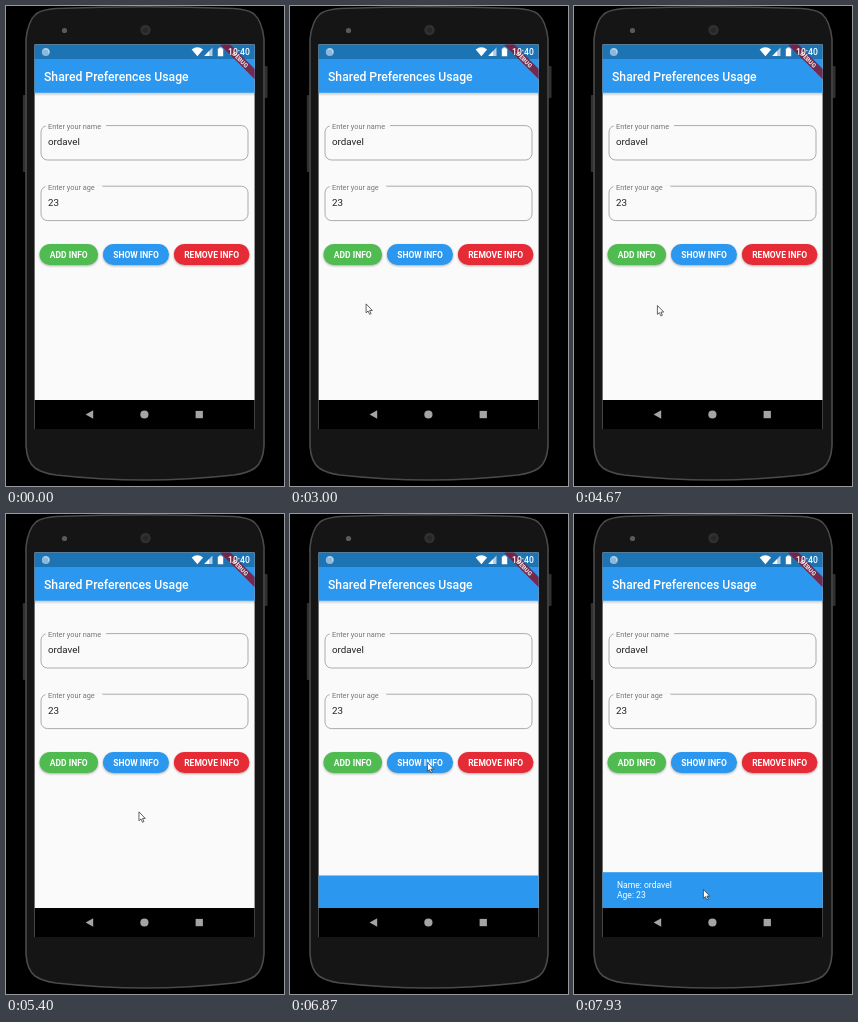
Recreate the animation shown at these times as an HTML page. Size 278 px wide and 480 px high, loop 8 s.

```html
<!DOCTYPE html>
<html lang="en">
<head>
<meta charset="utf-8">
<title>Saved info demo</title>
<style>
  html, body { margin: 0; width: 100%; height: 100%; overflow: hidden; background: #000; }
  svg { display: block; width: 100vw; height: 100vh; font-family: Roboto, "Open Sans", sans-serif; }
  .title { font-size: 12.2px; font-weight: 500; fill: #fff; }
  .label { font-size: 7.33px; fill: #777; }
  .value { font-size: 9.8px; fill: #222; }
  .box { fill: none; stroke: #999; stroke-width: .8; }
  .button text { font-size: 8.5px; font-weight: 700; fill: #fff; text-anchor: middle; }
  .snack { font-size: 8.55px; fill: #fff; }
  .clock { font-size: 8.6px; font-weight: 500; fill: #fff; }
  .banner { font-size: 6.1px; font-weight: 900; fill: #e8dde2; text-anchor: middle; }
</style>
</head>
<body>
<svg viewBox="0 0 278 480" preserveAspectRatio="none">
  <defs>
    <filter id="soft" x="-20%" y="-40%" width="140%" height="200%">
      <feGaussianBlur stdDeviation=".9"/>
    </filter>
    <linearGradient id="fade" x2="0" y2="1">
      <stop stop-color="#000" stop-opacity=".2"/>
      <stop offset="1" stop-color="#000" stop-opacity="0"/>
    </linearGradient>
    <clipPath id="screen"><rect x="28.6" y="38.6" width="220" height="384.4"/></clipPath>
    <clipPath id="page"><rect x="28" y="87" width="222" height="307"/></clipPath>
  </defs>

  <rect width="278" height="480" fill="#000"/>

  <!-- phone body -->
  <g fill="#303030">
    <rect x="16.8" y="89" width="3" height="77" rx="1"/>
    <rect x="258.5" y="60" width="3" height="32" rx="1"/>
  </g>
  <path d="M139 .8Q95 .8 50 2.5Q36 3.5 30 8Q22 15 20 33V440Q21 456 29 462Q36 467 50 469Q95 474 139 474T228 469Q242 467 249 462Q257 456 258 440V33Q256 15 248 8Q242 3.5 228 2.5Q183 .8 139 .8Z"
        fill="#151515" stroke="#4a4a4a" stroke-width="1.6"/>
  <circle cx="139.5" cy="24" r="5.2" fill="#303030"/>
  <circle cx="139.5" cy="24" r="2.6" fill="#22282c"/>
  <circle cx="58.5" cy="24.5" r="2.6" fill="#5a5a5a"/>

  <g clip-path="url(#screen)">
    <rect x="28" y="38" width="222" height="386" fill="#fafafa"/>
    <rect x="28" y="86.7" width="222" height="3.5" fill="url(#fade)"/>
    <rect x="28" y="38" width="222" height="15" fill="#1d74b5"/>
    <rect x="28" y="53" width="222" height="33.8" fill="#2b97ee"/>
    <text class="title" x="38" y="74.9">Shared Preferences Usage</text>

    <!-- status icons -->
    <circle cx="39.8" cy="46" r="4" fill="#8db9dc"/>
    <path d="M38 43.5A3 3 0 0 1 42.6 47" fill="none" stroke="#c9dfef"/>
    <g fill="#fff">
      <path d="M185.7 43.6Q191.4 39 197.1 43.6L191.4 50.3Z"/>
      <path d="M206.5 41.6V50H198.3Z" fill-opacity=".65"/>
      <path d="M203.2 45V50H198.3Z"/>
      <path d="M211.8 42.6H213.2V41.5H215.8V42.6H217.2V50.2H211.8Z"/>
    </g>

    <g transform="translate(249 39) rotate(45)">
      <rect x="-24.5" y="17.1" width="49" height="7.3" fill="#7d1d3c" fill-opacity=".9"/>
      <text class="banner" y="23">DEBUG</text>
    </g>
    <text class="clock" x="222" y="49.2">10:40</text>

    <g id="fields"></g>
    <g id="buttons"></g>

    <g clip-path="url(#page)">
      <rect id="bar" x="28" width="222" height="36" fill="#2b97ee"/>
      <g id="note">
        <text class="snack" x="43" y="374.2">Name: ordavel</text>
        <text class="snack" x="43" y="383.8">Age: 23</text>
      </g>
    </g>

    <rect x="28" y="394" width="222" height="30" fill="#000"/>
    <g fill="#a4a4a4">
      <path d="M87.2 404.2V412.8L79.6 408.5Z"/>
      <circle cx="138.4" cy="408.5" r="4.1"/>
      <rect x="189.6" y="404.9" width="7.3" height="7.3"/>
    </g>
  </g>

  <path id="pointer" d="M.4 .5V9.4L2.4 7.6L3.9 10.9L5.4 10.2L3.9 7.1H6.7Z"
        fill="#fff" stroke="#333" stroke-width=".75" stroke-linejoin="round"/>
</svg>

<script>
  const get = id => document.getElementById(id);
  const LOOP = 8000, TICK = 200 / 3;

  function field(label, value, row) {
    const y = 119.6 + 60.6 * row;
    const gap = 5 + label.length * 3.7;
    return `<rect class="box" x="35" y="${y}" width="207" height="34.4" rx="6.5"/>
      <rect x="39.5" y="${y - 1}" width="${gap}" height="2" fill="#fafafa"/>
      <text class="label" x="42" y="${y + 3.3}">${label}</text>
      <text class="value" x="42" y="${y + 19.8}">${value}</text>`;
  }
  get("fields").innerHTML =
    field("Enter your name", "ordavel", 0) + field("Enter your age", "23", 1);

  let left = 33.5;
  function button(label, color, width) {
    const pill = `x="${left}" width="${width}" height="21.2" rx="10.6"`;
    const middle = left + width / 2;
    left += width + 4.9;
    return `<g class="button">
      <rect ${pill} y="238.9" fill-opacity=".32" filter="url(#soft)"/>
      <rect ${pill} y="237.9" fill="${color}"/>
      <text x="${middle}" y="251.6">${label}</text></g>`;
  }
  get("buttons").innerHTML = button("ADD INFO", "#4fbb50", 58.6)
    + button("SHOW INFO", "#2b97ee", 66) + button("REMOVE INFO", "#e52b36", 75.5);

  // Pointer legs; bow swings the leg sideways.
  const home = { x: 11, y: 258 };
  const legs = [
    { from: 733, to: 1200, x: 76, y: 299 },
    { from: 2933, to: 3600, x: 65, y: 243 },
    { from: 4200, to: 4670, x: 83, y: 299 },
    { from: 4670, to: 5130, x: 127, y: 304 },
    { from: 5200, to: 6130, x: 137, y: 248, bow: 12 },
    { from: 7400, to: 7930, x: 129, y: 375 }
  ];

  const progress = (t, from, to) => Math.min(1, Math.max(0, (t - from) / (to - from)));
  const smooth = k => k * k * (3 - 2 * k);

  function pointAt(t) {
    let { x, y } = home;
    for (const leg of legs) {
      const k = smooth(progress(t, leg.from, leg.to));
      x += (leg.x - x) * k + (leg.bow || 0) * Math.sin(Math.PI * k);
      y += (leg.y - y) * k;
    }
    return [x, y];
  }

  function draw(time) {
    const t = Math.floor((time + 4) / TICK) * TICK;
    const pointer = get("pointer");
    pointer.setAttribute("visibility", t >= 799 ? "visible" : "hidden");
    pointer.setAttribute("transform", `translate(${pointAt(t)})`);

    const open = progress(t, 6705, 6955);
    get("bar").setAttribute("y", 394 - 35.8 * (1 - (1 - open) ** 2.3));
    get("note").setAttribute("opacity", progress(open, .72, 1));
  }

  const start = performance.now();
  function loop() {
    draw((performance.now() - start) % LOOP);
    requestAnimationFrame(loop);
  }
  loop();
</script>
</body>
</html>
```
